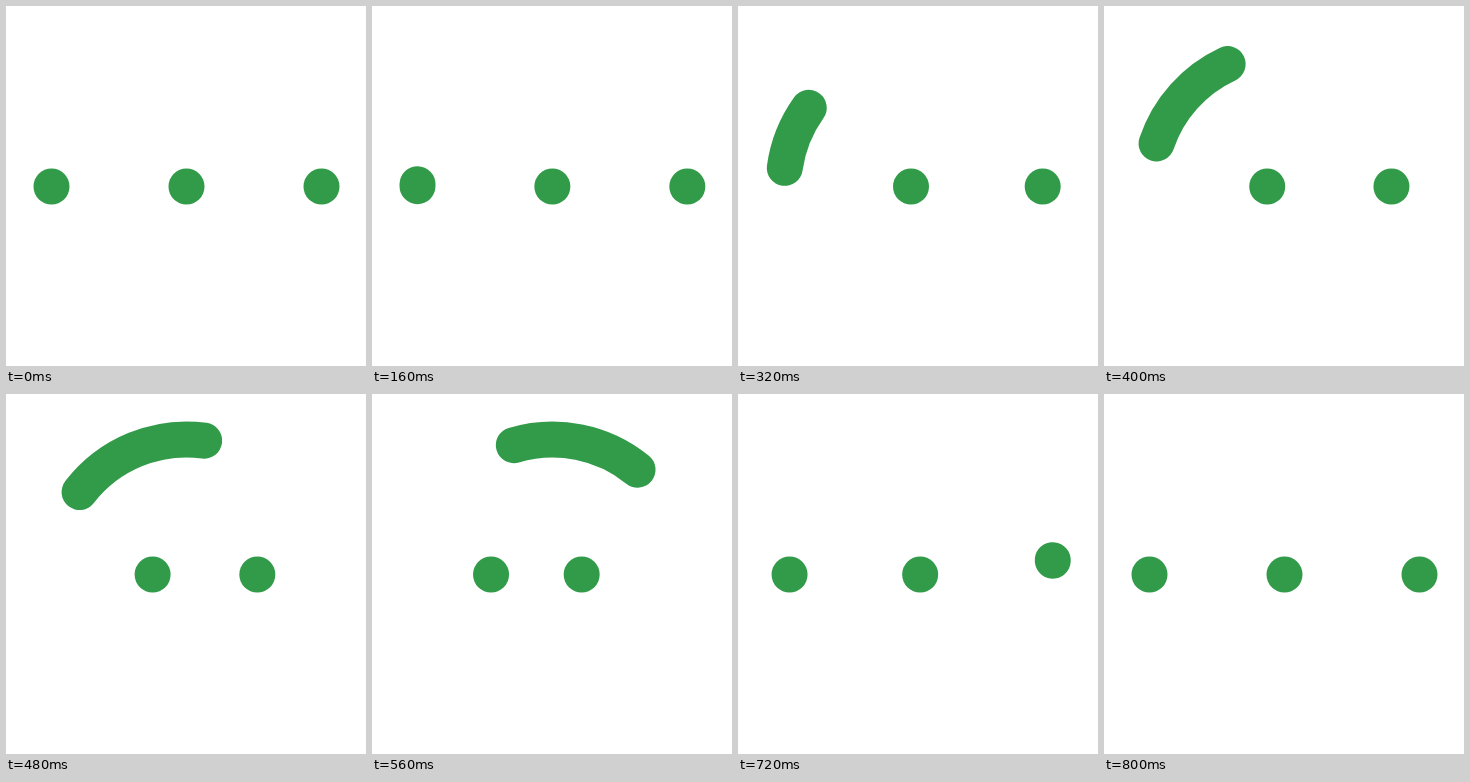
Write an HTML page that moves like this. It is 360 by 360 pixels and loops after 960 ms.

```html
<!DOCTYPE html>
<html lang="en">
<head>
<meta charset="utf-8">
<title>Dots loader</title>
<style>
html, body { margin: 0; width: 100%; height: 100%; overflow: hidden; background: #fff; }
svg { display: block; width: 100vw; height: 100vh; }
</style>
</head>
<body>
<svg viewBox="0 0 360 360">
  <path id="arc" fill="none" stroke="#329b49" stroke-width="36" stroke-linecap="round"/>
  <g fill="#329b49">
    <circle id="mid" cy="180.5" r="18"/>
    <circle id="right" cy="180.5" r="18"/>
  </g>
</svg>
<script>
const LOOP = 960, STEP = 40, START = 131.6, LENGTH = 660;
const CENTER = 180.5, GAP = 135;
const [arc, mid, right] = ['arc', 'mid', 'right'].map(id => document.getElementById(id));

// Cubic-bezier easing with handles (a, 0) and (b, 1)
const ease = (a, b) => x => {
  let lo = 0, hi = 1;
  for (let i = 0; i < 30; i++) {
    const s = (lo + hi) / 2, r = 1 - s;
    if (3 * a * s * r * r + 3 * b * s * s * r + s * s * s < x) lo = s;
    else hi = s;
  }
  return lo * lo * (3 - 2 * lo);
};

const headEase = ease(1 / 3, 2 / 3);
const tailEase = ease(0.89, 0.605);
const midEase = ease(0.785, 0.667);
const rightEase = ease(0.705, 0.392);

function point(turn) {
  const a = Math.PI * turn;
  const x = CENTER - GAP * Math.cos(a), y = CENTER - GAP * Math.sin(a);
  return x.toFixed(3) + ' ' + y.toFixed(3);
}

function draw(time) {
  const t = Math.floor((time % LOOP) / STEP) * STEP;
  const x = Math.min(1, Math.max(0, (t - START) / LENGTH));
  const moving = x > 0 && x < 1;
  const tail = moving ? tailEase(x) : x;
  const head = moving ? headEase(x) : x;
  const from = point(tail);
  arc.setAttribute('d', moving && head - tail > 0.0005
    ? `M${from}A${GAP} ${GAP} 0 0 1 ${point(head)}`
    : `M${from}h.001`);
  mid.setAttribute('cx', CENTER - GAP * (moving ? midEase(x) : x));
  right.setAttribute('cx', CENTER + GAP * (1 - (moving ? rightEase(x) : x)));
}

const begin = performance.now();
function tick() {
  draw(performance.now() - begin);
  requestAnimationFrame(tick);
}
tick();
</script>
</body>
</html>
```
